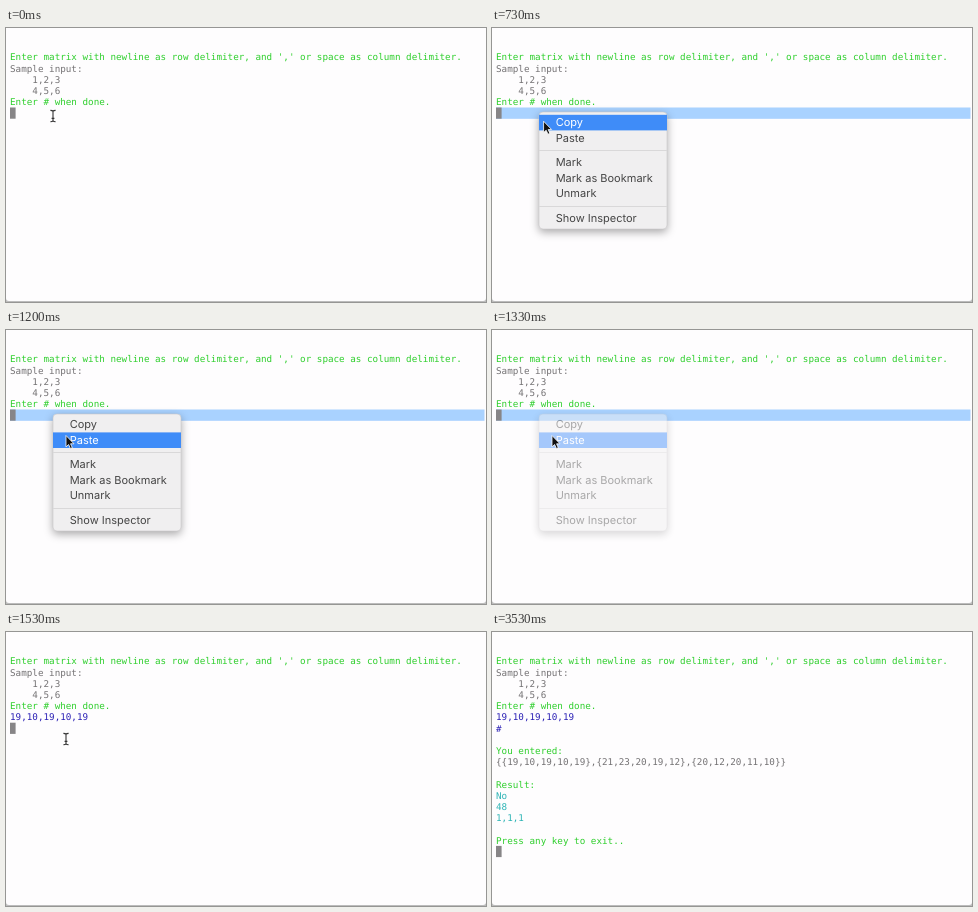
Recreate the animation shown at these times as an HTML page. Size 480 by 274 pixels, loop 3.99 s.

```html
<!DOCTYPE html>
<html lang="en">
<head>
<meta charset="utf-8">
<title>Matrix input</title>
<style>
  html, body { margin: 0; width: 100%; height: 100%; overflow: hidden; background: #fefdfe; }
  svg { display: block; width: 480px; height: 274px; }
  text { text-rendering: geometricPrecision; white-space: pre; }
  #terminal { font: 9.27px "DejaVu Sans Mono", monospace; }
  #menu { font: 11px Inter, sans-serif; fill: #454545; }
  .panel { fill: #f0eff0; stroke: #c9c8c9; stroke-width: .6; filter: drop-shadow(0 3px 4px #0005); }
  .separator { fill: #d9d8d9; }
</style>
</head>
<body>
<svg viewBox="0 0 480 274">
  <rect width="480" height="274" fill="#bcbcbc"/>
  <rect y="-10" width="480" height="283" rx="3" fill="#fefdfe"/>
  <rect id="lineMark" x="4" y="79.5" width="474.5" height="11.3" fill="#a9d2ff"/>
  <rect id="block" width="5.6" height="11.2" fill="#878587"/>
  <g id="terminal"></g>
  <g id="menu">
    <rect class="panel" x="47" y="84" width="128" height="117" rx="4"/>
    <rect id="choice" x="47" width="128" height="15.6" fill="#3f8cf8"/>
    <rect class="separator" x="47" y="122" width="128" height="1"/>
    <rect class="separator" x="47" y="178" width="128" height="1"/>
  </g>
  <path id="arrow" d="M0 0V11.4L2.6 9L4.4 13L6.3 12.2L4.6 8.3H8Z" fill="#111" stroke="#fff" stroke-width=".8"/>
  <path id="beam" d="M-2.6 -5.6Q-.4 -5.6 0 -4.6Q.4 -5.6 2.6 -5.6M0 -4.6V4.8M-2.6 5.8Q-.4 5.8 0 4.8Q.4 5.8 2.6 5.8M-1.4 2.4H1.4"
        fill="none" stroke="#333" stroke-width="1.1"/>
</svg>
<script>
const LOOP = 3990, STEP = 1000 / 15, ROW = 11.2, CELL = 5.58;
const GREEN = '#2fcf2d', GREY = '#747274', BLUE = '#2b20b5', TEAL = '#2db4b5';
const byId = id => document.getElementById(id);
const [lineMark, block, terminal, menu, choice, arrow, beam] =
  ['lineMark', 'block', 'terminal', 'menu', 'choice', 'arrow', 'beam'].map(byId);

function addText(parent, x, y, content, fill) {
  const node = document.createElementNS('http://www.w3.org/2000/svg', 'text');
  node.setAttribute('x', x);
  node.setAttribute('y', y);
  if (fill) node.setAttribute('fill', fill);
  node.textContent = content;
  return parent.appendChild(node);
}

// row, column, text, colour, time of appearance
const lines = [
  [0, 0, "Enter matrix with newline as row delimiter, and ',' or space as column delimiter.", GREEN, 0],
  [1, 0, 'Sample input:', GREY, 0],
  [2, 4, '1,2,3', GREY, 0],
  [3, 4, '4,5,6', GREY, 0],
  [4, 0, 'Enter # when done.', GREEN, 0],
  [5, 0, '19,10,19,10,19', BLUE, 1530],
  [6, 0, '#', BLUE, 3000],
  [8, 0, 'You entered:', GREEN, 3400],
  [9, 0, '{{19,10,19,10,19},{21,23,20,19,12},{20,12,20,11,10}}', GREY, 3400],
  [11, 0, 'Result:', GREEN, 3530],
  [12, 0, 'No', TEAL, 3530],
  [13, 0, '48', TEAL, 3530],
  [14, 0, '1,1,1', TEAL, 3530],
  [16, 0, 'Press any key to exit..', GREEN, 3530]
].map(([row, col, content, color, from]) =>
  ({ from, node: addText(terminal, 4 + col * CELL, 32.3 + row * ROW, content, color) }));

const items = [['Copy', 94.5], ['Paste', 110], ['Mark', 134.5],
  ['Mark as Bookmark', 149.7], ['Unmark', 165], ['Show Inspector', 189.8]]
  .map(([label, y]) => addText(menu, 63.7, y + 3.9, label));

// start time, column, row of the text cursor
const blockStops = [[0, 0, 5], [1530, 0, 6], [3000, 1, 6], [3400, 0, 11], [3530, 0, 17]];

const show = (node, on) => node.style.display = on ? '' : 'none';
const place = (node, x, y) => node.setAttribute('transform', `translate(${x} ${y})`);
const clamp = v => Math.max(0, Math.min(1, v));

function draw(t) {
  for (const { node, from } of lines) show(node, t >= from);
  const [, col, row] = blockStops.findLast(stop => t >= stop[0]);
  place(block, 4 + col * CELL, 23.5 + row * ROW);

  const menuOpen = t >= 330 && t < 1530;
  show(lineMark, menuOpen);
  show(menu, menuOpen);
  show(arrow, menuOpen);
  show(beam, t < 330 || (t >= 1530 && t < 3000));
  place(beam, t < 330 ? 47 : 60, t < 330 ? 88 : 107);

  // The pointer advances at fifteen steps a second.
  const tick = Math.floor((t + 5) / STEP);
  const move = clamp((tick - 9) / 5);
  const eased = move * move * (3 - 2 * move);
  const pointerY = 86.5 + 19 * eased;
  place(arrow, 47 + 13 * eased, pointerY);

  const blink = t >= 1130 && t < 1200;
  const selected = move === 0 || blink ? -1 : pointerY < 102.3 ? 0 : 1;
  show(choice, selected >= 0);
  choice.setAttribute('y', selected === 0 ? 86.8 : 102.4);
  items.forEach((item, i) => item.setAttribute('fill', i === selected ? '#fff' : '#454545'));
  menu.style.opacity = t < 1270 ? 1 : [.75, .46, .18, 0][Math.min(3, Math.max(0, tick - 19))];
}

const start = performance.now();
function loop() {
  draw((performance.now() - start) % LOOP);
  requestAnimationFrame(loop);
}
loop();
</script>
</body>
</html>
```
